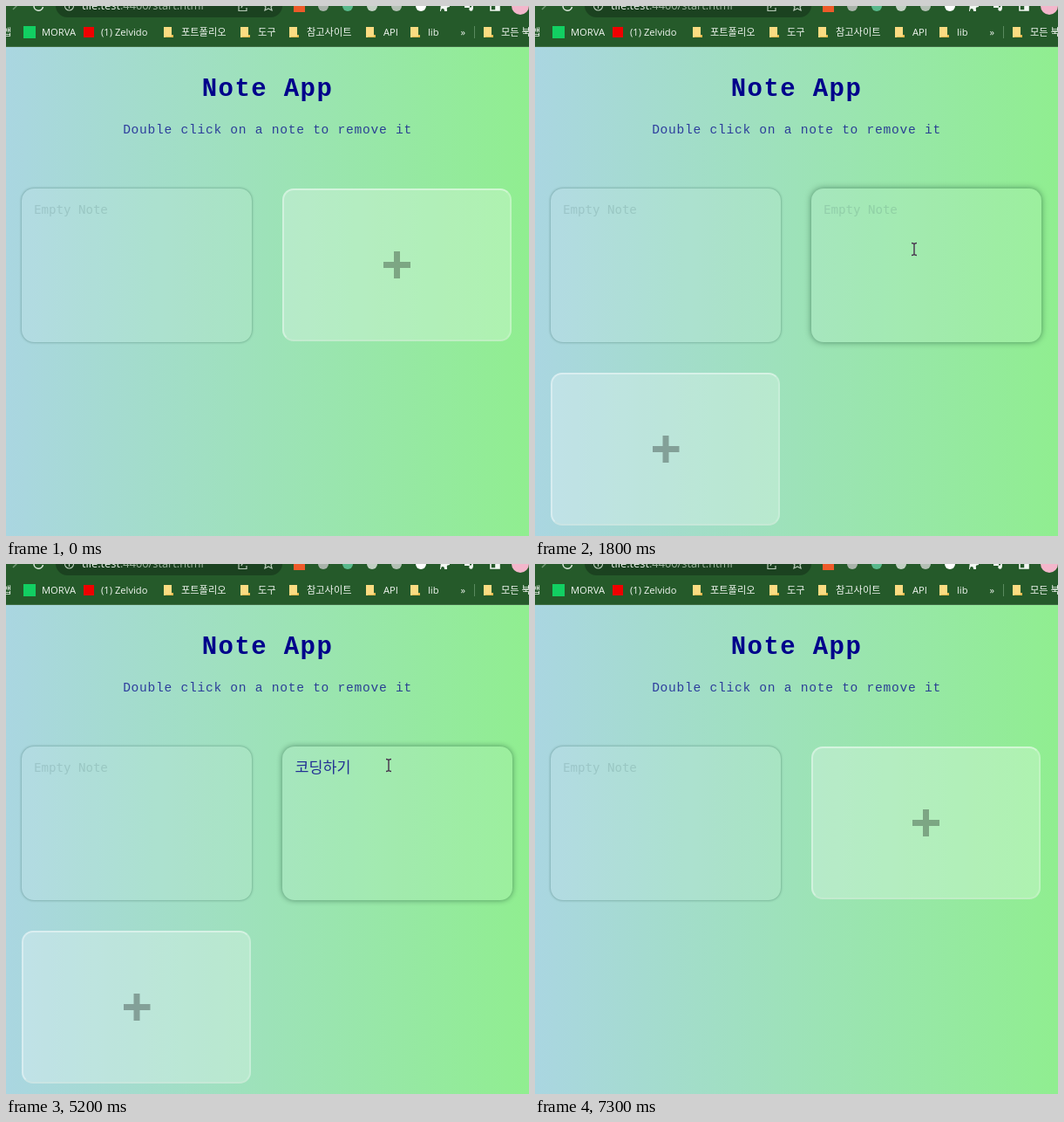
Write an HTML page that moves like this. It is 600 by 607 pixels and loops after 8.1 s.

```html
<!DOCTYPE html>
<html lang="ko">
<head>
<meta charset="utf-8">
<title>Note App</title>
<style>
  html, body { margin: 0; width: 100%; height: 100%; overflow: hidden; }
  body { position: relative; background: linear-gradient(to right, #aad6e1, lightgreen); }
  svg, .card, .add, #dialog { position: absolute; box-sizing: border-box; }
  svg { left: 0; top: 0; width: 600px; height: 607px; }
  text { white-space: pre; }
  .ui { font-family: "Open Sans", "Noto Sans CJK KR", sans-serif; }
  .mono { font-family: "Liberation Mono", monospace; fill: darkblue; text-anchor: middle; }
  .empty { font: 14.1px "DejaVu Sans Mono", monospace; fill: rgba(60, 100, 100, .18); }
  .typed { font: 300 17.4px "Noto Sans CJK KR", sans-serif; fill: rgba(0, 0, 139, .8); }
  .card { width: 264px; height: 176px; top: 209px; border-radius: 14px; background: rgba(255, 255, 255, .1);
    box-shadow: 0 0 3px rgba(0, 50, 40, .45); }
  .add { width: 263px; height: 175px; border-radius: 13px; background: rgba(255, 255, 255, .27);
    border: 2px solid; border-color: rgba(255, 255, 255, .42) rgba(255, 255, 255, .22) rgba(225, 235, 225, .32) rgba(255, 255, 255, .38); }
  .add::before { content: ""; position: absolute; left: 114.5px; top: 70px; width: 31px; height: 31px;
    background: rgba(0, 0, 0, .3);
    clip-path: polygon(12px 0, 19px 0, 19px 12px, 100% 12px, 100% 19px, 19px 19px, 19px 100%, 12px 100%, 12px 19px, 0 19px, 0 12px, 12px 12px); }
  #dialog { left: 102px; top: 13px; width: 394px; height: 115px; border-radius: 4px; background: #fff;
    box-shadow: 0 1px 3px rgba(0, 0, 0, .6); }
  #dialog svg { left: -102px; top: -13px; }
  #cursor { overflow: visible; }
</style>
</head>
<body>
<svg id="page">
  <rect width="600" height="47" fill="#255a2a"/>
  <rect y="46" width="600" height="1" fill="#3f6d43"/>
  <rect x="57" y="-14" width="260" height="27" rx="13.5" fill="#1b4220"/>
  <g fill="none" stroke="#dce8dc" stroke-width="1.5">
    <path d="M8 4l5-5" stroke="#6f9572"/>
    <path d="M32 0a5.3 5.3 0 0 0 10.5 1"/>
    <g stroke="#b9cbb9" stroke-width="1.2">
      <circle cx="72.5" cy="0" r="5"/><path d="M72.5-1v4M267-2v7.5h9V2M270 2q1-4 7-4"/>
      <path d="M297 5l1-4-3-3h4l2-4 2 4h4l-3 3 1 4-4-2z"/>
    </g>
  </g>
  <text class="ui" x="87" y="4" font-size="12.8" fill="#eef4ee">tile.test<tspan fill="#9fb5a0">:4400/start.html</tspan></text>
  <rect x="330" y="-6" width="13" height="13" fill="#ef5a2a"/>
  <g id="extensions"></g>
  <path d="M499-3h10v4q-4 0-3 3v2h-3q0-3-2-3t-2 3h-1z" fill="#f2f7f2"/>
  <path d="M526 1h6M535-4v7" stroke="#f2f7f2" stroke-width="1.8"/><circle cx="533.5" cy="3.5" r="2.2" fill="#f2f7f2"/>
  <path d="M556-5v10h10V-5M562-5v10h4V-5" stroke="#f2f7f2" stroke-width="1.6" fill="none"/><rect x="562" y="-5" width="4" height="10" fill="#f2f7f2"/>
  <circle cx="590" cy="0" r="10" fill="#f3b6cb"/>
  <rect x="20" y="23" width="14" height="14" fill="#12cf62"/>
  <rect x="89" y="24" width="12" height="12" fill="#f00000"/>
  <path d="M537.5 23v14" stroke="#5a8a5e"/>
  <g id="bookmarks" class="ui" font-size="11.2" fill="#f1f6f1"></g>
  <text class="mono" x="300" y="103" font-size="29" letter-spacing="1.4" font-weight="bold">Note App</text>
  <text class="mono" x="300" y="145.5" font-size="14.6" letter-spacing=".72" opacity=".72">Double click on a note to remove it</text>
</svg>

<div class="card" style="left:18px"></div>
<div class="card" id="note" style="left:317px"></div>
<div class="add" id="add"></div>

<svg>
  <text class="empty" x="32" y="238">Empty Note</text>
  <text class="empty" id="hint" x="331" y="238">Empty Note</text>
  <rect id="selection" x="331.5" y="224" width="65" height="17.5" fill="#1c5fcb"/>
  <text class="typed" id="typed" x="331.5" y="238.5"></text>
  <rect id="underline" y="240" width="16" height="1" fill="#00105c"/>
  <rect id="caret" y="224" width="1.2" height="17" fill="#00105c"/>
</svg>

<div id="dialog">
  <svg class="ui">
    <text x="116.5" y="43" font-size="13.4" fill="#202124">tile.test:4400 내용:</text>
    <text x="116.5" y="68" font-size="11.45" fill="#3c4043">Do you want to delete this note?</text>
    <rect x="362.5" y="85.5" width="56" height="29" rx="4" fill="#fff" stroke="#1a66cc" stroke-width="2"/>
    <rect x="364.5" y="87.5" width="52" height="25" rx="2.5" fill="#1a73e8"/>
    <rect x="426.5" y="86.5" width="55" height="28" rx="3.5" fill="#fff" stroke="#d7dde3"/>
    <g font-size="11" text-anchor="middle">
      <text x="390.5" y="104" fill="#fff">확인</text>
      <text x="454" y="104" fill="#1a73e8">취소</text>
    </g>
  </svg>
</div>

<svg id="cursor">
  <path id="arrow" d="M0 0v16l3.7-3.4 2.5 5.8 2.5-1-2.5-5.7h5.1z" fill="#fff" stroke="#111"/>
  <path id="beam" d="M-3-7.5q2.500 0 3 1.200q.5-1.200 3-1.200M0-6.500v12M-3 6.500q2.500 0 3-1.200q.5 1.200 3 1.200" fill="none" stroke="#46304c" stroke-width="1.4"/>
  <path id="hand" d="M-1.500 1.500q0-1.700 1.500-1.700t1.500 1.700v6q0-1.300 1.500-1.200t1.500 1.500q0-1.200 1.400-1t1.400 1.500q0-1 1.200-.8t1.200 1.500v4q0 3-2 5v2.500H0V18l-4.500-6q-1-2 .5-2.500t2.500 1.500z" fill="#fff" stroke="#222"/>
</svg>

<script>
const $ = id => document.getElementById(id);
const show = (id, on) => { $(id).style.display = on ? "" : "none"; };
const LOOP = 8100, STEP = 100;
const ADDED = 1300, SELECTED = 5600, ASKED = 5800, REMOVED = 6700;

$("bookmarks").innerHTML = [
  [-4, "앱"], [41, "MORVA"], [109, "(1) Zelvido"], [201, "포트폴리오", 1], [289, "도구", 1],
  [345, "참고사이트", 1], [433, "API", 1], [484, "lib", 1], [521.5, "»"], [568, "모든 북마크", 1]
].map(([x, label, folder]) =>
  (folder ? `<path d="M${x - 20} 24h9v12h-9z" fill="#fbdc82"/><path d="M${x - 11} 33h2v3h-9v-1h7z" fill="#e5b94e"/>` : "") +
  `<text x="${x}" y="34">${label}</text>`).join("");

$("extensions").innerHTML = ["#a9b3aa", "#59b98c", "#c3d0c4", "#b3c0b4", "#ffffff"]
  .map((color, i) => `<circle cx="${364 + 28 * i}" cy="0" r="6" fill="${color}"/>`).join("");

// Keys are [time, ...values], joined by straight lines.
const path = [
  [100, 588, 512], [500, 470, 370], [900, 388, 289], [1200, 388, 289], [1800, 435, 279], [2000, 435, 279],
  [2100, 434, 278], [4300, 434, 278], [4700, 445, 427], [4800, 445, 427], [5200, 439, 231], [5400, 377, 232],
  [5700, 377, 232], [6000, 420, 218], [6300, 392, 102], [6700, 392, 102], [7300, 400, -25]
];
const hover = [[1300, 0], [1600, 1], [4500, 1], [4800, 0], [4900, 0], [5300, 1]];
const typing = [
  [2800, "ㅋ"], [2900, "코"], [3000, "콛"], [3100, "코디"], [3300, "코딩"],
  [3500, "코딩ㅎ"], [3600, "코딩하"], [3700, "코딩학"], [3800, "코딩하기"]
];

function track(keys, t) {
  const next = keys.findIndex(k => k[0] > t);
  if (next < 0) return keys.at(-1).slice(1);
  if (next === 0) return keys[0].slice(1);
  const a = keys[next - 1], b = keys[next], p = (t - a[0]) / (b[0] - a[0]);
  return a.slice(1).map((v, i) => v + (b[i + 1] - v) * p);
}

const inside = (x, y, left, top, w, h) => x >= left && x < left + w && y >= top && y < top + h;

function drawNote(t, hasNote) {
  const [glow] = track(hover, t);
  const text = hasNote ? (typing.findLast(k => k[0] <= t) || [0, ""])[1] : "";
  const end = 332 + 16 * text.length;
  const selected = hasNote && t >= SELECTED;

  show("note", hasNote);
  $("note").style.boxShadow = `0 0 ${3 + 4 * glow}px rgba(0,50,30,${.45 + .05 * glow})`;
  $("add").style.left = (hasNote ? 18 : 316.5) + "px";
  $("add").style.top = (hasNote ? 420 : 209) + "px";

  show("hint", hasNote && !text);
  $("typed").textContent = text;
  $("typed").style.fill = selected ? "#d4e6ff" : "";
  show("selection", selected);
  show("underline", text && t < 3900);
  $("underline").setAttribute("x", end - 16);
  show("caret", t >= 2100 && t < 2600 || t >= 2800 && t < 4400);
  $("caret").setAttribute("x", end);
}

function drawCursor(t, hasNote, asking) {
  const [x, y] = track(path, t);
  const overDialog = asking && inside(x, y, 102, 13, 394, 115);
  const overCard = !overDialog && inside(x, y, 317, 209, 264, 176);
  const kind = overCard ? (hasNote ? "beam" : "hand") : "arrow";
  for (const id of ["arrow", "beam", "hand"]) show(id, id === kind);
  show("cursor", t >= 100 && t < 7300);
  $("cursor").style.transform = `translate(${x}px, ${y}px)`;
}

function frame() {
  const t = Math.floor(performance.now() % LOOP / STEP) * STEP;
  const hasNote = t >= ADDED && t < REMOVED;
  const asking = t >= ASKED && t < REMOVED;
  drawNote(t, hasNote);
  show("dialog", asking);
  drawCursor(t, hasNote, asking);
  requestAnimationFrame(frame);
}
frame();
</script>
</body>
</html>
```
